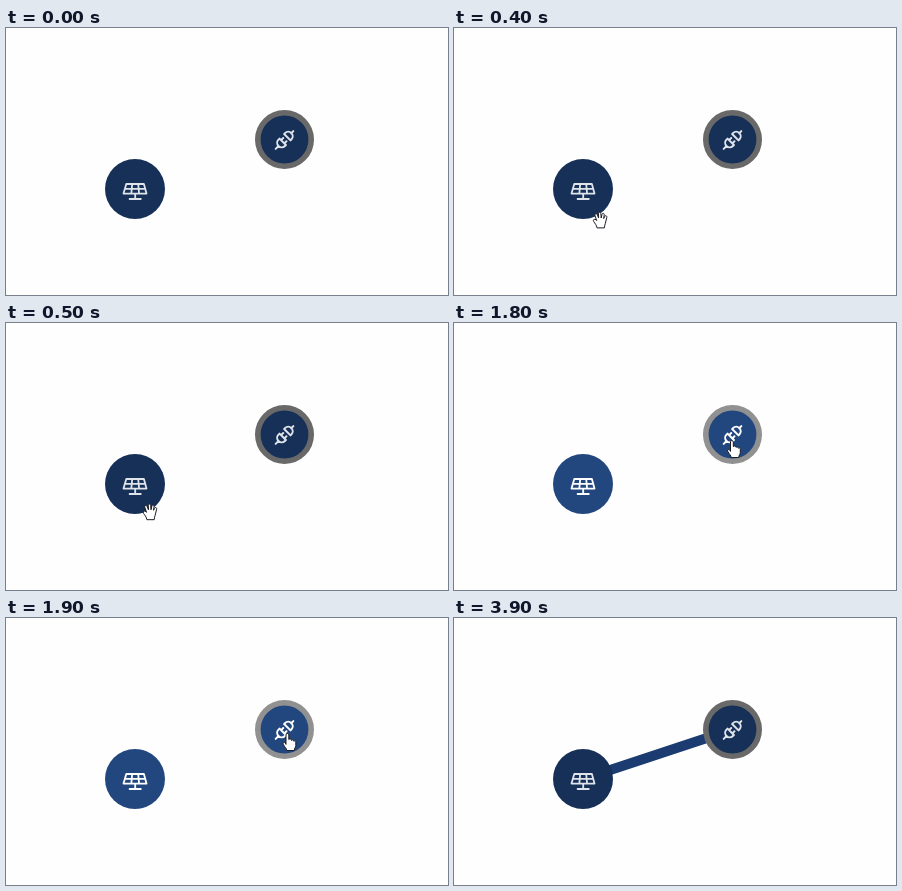
Recreate the animation shown at these times as an HTML page. Size 442 px wide and 267 px high, loop 4800 ms.

```html
<!DOCTYPE html>
<html lang="en">
<head>
<meta charset="utf-8">
<title>Connecting two nodes</title>
<style>
  html, body { margin: 0; height: 100%; overflow: hidden; background: #fefefe; }
  svg { display: block; width: 442px; height: 267px; }
  .icon { fill: none; stroke-linecap: round; stroke-linejoin: round; }
  .cursor { fill: #fff; stroke: #1b1b22; stroke-linejoin: round; stroke-linecap: round; }
</style>
</head>
<body>
<svg viewBox="0 0 442 267">
  <path id="edge" d="M129 161L278.5 111.5" stroke="#1c3b70" stroke-width="10"/>
  <circle id="panel" cx="129" cy="161" r="30"/>
  <path id="panelIcon" class="icon" stroke-width="1.8"
    d="M120.3 156h17.6l2.6 9.6h-23zM119 160.8h20.3M126.2 156l-.9 9.6M132.2 156l.9 9.6M129.2 166v5M123.6 171h11.2"/>
  <circle id="plug" cx="278.5" cy="111.5" r="26.7" stroke-width="5.6"/>
  <path id="plugIcon" class="icon" stroke-width="2" transform="translate(278.5 112) rotate(-45)"
    d="M-12.5 0h4M-2.5-4.5v9h-1.5a4.5 4.5 0 0 1 0-9zM-2.5-2.3h3M-2.5 2.3h3M4-4.5v9h1.2a4.5 4.5 0 0 0 0-9zM9.5 0h3"/>
  <path id="grab" class="cursor" stroke-width="1"
    d="M-3 7.5C-4-5.500-4 4.500-6.300 1.500C-7.500-.2-5.500-1.500-4-.2L-3.300.6L-5-4.500C-5.500-6.300-3.300-7-2.600-5.200L-1.400-2L-1.500-6.300C-1.500-8.200.7-8.200.9-6.300L1.200-2L2-5.600C2.500-7.400 4.500-6.800 4.200-5L3.700-1.500L4.700-3.500C5.600-5 7.200-4.200 6.800-2.500L5.300 3.500C4.900 5 4.500 6 4.400 7.500z"/>
  <path id="point" class="cursor" stroke-width="1"
    d="M-1.500 9V1.300C-1.500-.5 1.300-.5 1.300 1.300V6C2-.0 4 5.300 4 6.900C4.700 5.900 6.300 6.300 6.300 7.700C7.200 7 8.300 7.400 8.300 8.700V12C8.300 14 6.800 14.500 6.800 17H-.8C-.8 15-3 13.500-4.300 10.700C-5.200 8.800-3.200 8-2.400 9.300L-1.500 10.500z"/>
</svg>
<script>
const LOOP = 4800;
const el = id => document.getElementById(id);
const set = (id, name, value) => el(id).setAttribute(name, value);
const show = (id, on) => set(id, "visibility", on ? "visible" : "hidden");
const move = (id, x, y) => set(id, "transform", `translate(${x} ${y})`);

// Cleaner outlines for the two hands
set("grab", "d", "M-3 7.500C-3.500 5-5 3.500-6.300 1.500C-7.400-.2-5.500-1.500-4-.2L-3.300.6L-5-4.500" +
  "C-5.500-6.300-3.300-7-2.600-5.200L-1.400-2L-1.500-6.300C-1.500-8.200.7-8.200.9-6.300L1.200-2L2-5.600" +
  "C2.500-7.400 4.500-6.800 4.200-5L3.700-1.500L4.700-3.500C5.600-5 7.200-4.200 6.800-2.500L5.300 3.500" +
  "C4.900 5 4.500 6 4.400 7.500z");
set("point", "d", "M-1.500 10.500V1.300C-1.500-.4 1.300-.4 1.300 1.300V6C2 5 4 5.300 4 6.900" +
  "C4.700 5.900 6.300 6.300 6.300 7.700C7.200 7 8.300 7.400 8.300 8.700V12C8.300 14 6.800 14.500 6.800 17" +
  "H-.8C-.8 15-3 13.500-4.300 10.700C-5.200 8.800-3.200 8-2.400 9.300z");

function paint(node, lit) {
  set(node, "fill", lit ? "#22477f" : "#163058");
  set(node + "Icon", "stroke", lit ? "#fff" : "#dfe3ea");
}

function draw(now) {
  const t = now % LOOP;
  const between = (a, b) => t >= a && t < b;

  paint("panel", between(700, 3300));
  paint("plug", between(1800, 3900));
  set("plug", "stroke", between(1800, 3900) ? "#919191" : "#696969");
  show("edge", t >= 3300);

  // The open hand glides in from below, in 100 ms steps
  show("grab", between(100, 700));
  const step = Math.min(5, Math.max(0, Math.floor(t / 100) - 1));
  const left = (1 - step / 6) ** 4;
  move("grab", 143.3 + 43 * left, 188 + 64 * left);

  show("point", between(700, 3900));
  if (t < 1800) move("point", 140.5, 181.5);
  else if (t < 1900) move("point", 278, 117.5);
  else move("point", 281.5, 115.5);

  requestAnimationFrame(() => draw(performance.now() - start));
}

const start = performance.now();
draw(0);
</script>
</body>
</html>
```
